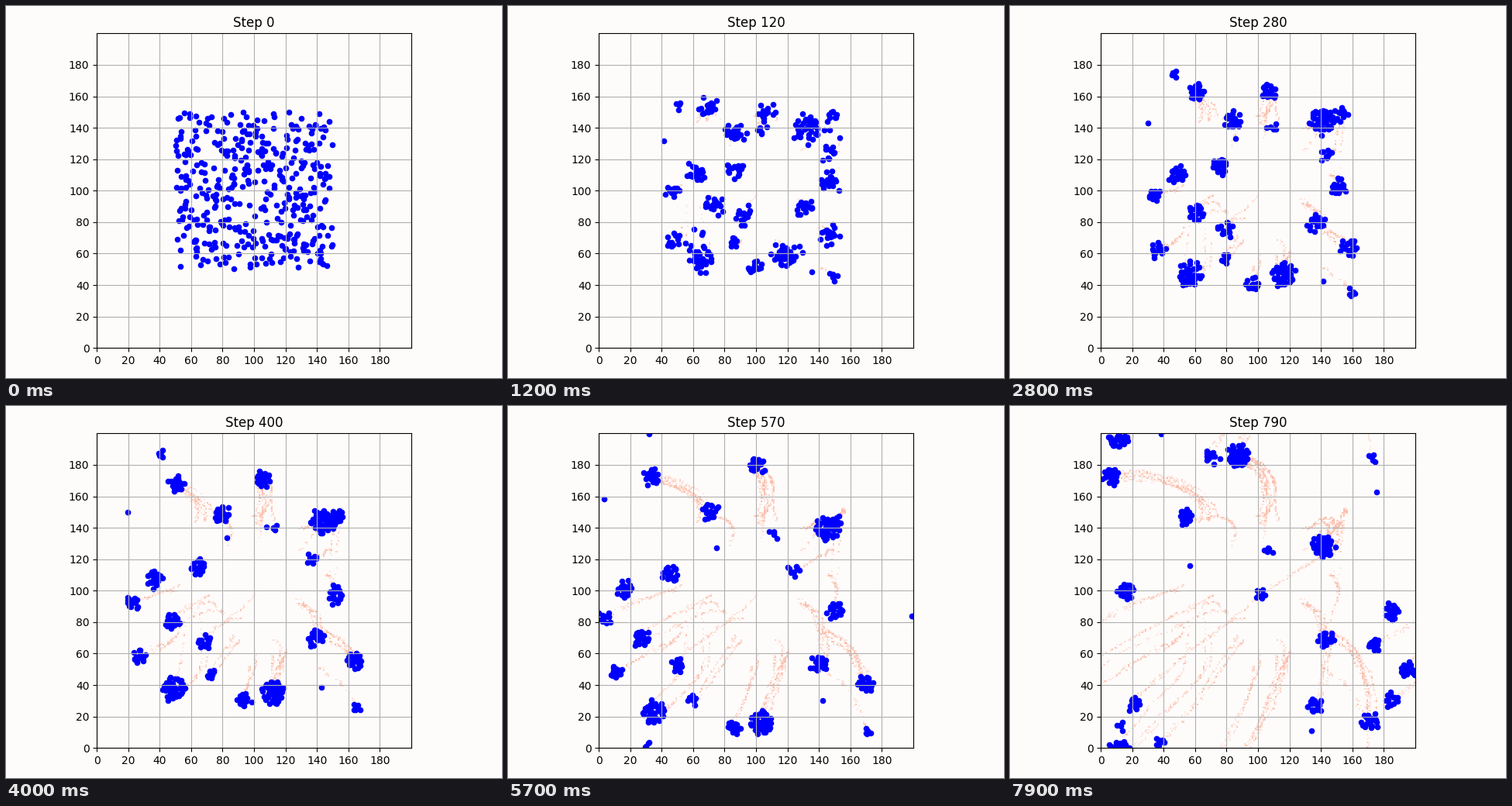
Write a matplotlib script that moves like this. It is 640 px wide and 480 px high and loops after 8 s.

```python
import numpy as np
import matplotlib.pyplot as plt
from matplotlib.animation import FuncAnimation

FRAMES, SUB = 80, 10
STEPS = FRAMES * SUB
SIZE = 200
BG = "#fefcfb"
GOLDEN = np.pi * (3 - np.sqrt(5))

# Flock size -> where such flocks gather and where they end (x0, y0, x1, y1).
FLOCKS = {
    40: [(134, 144, 141, 128), (64, 54, 11, -2), (118, 59, 87, -14)],
    20: [(62, 111, -15, 87), (147, 72, 171, 17), (130, 90, 136, 27),
         (71, 153, 6, 173), (74, 91, -5, 50), (88, 114, 16, 100),
         (147, 106, 143, 69), (106, 150, 88, 185), (86, 138, 54, 147)],
    14: [(46, 100, -26, 66), (45, 65, -15, 31), (91, 84, 21, 28),
         (99, 51, 70, -15), (149, 149, 141, 130)],
    8: [(150, 125, 102, 98), (86, 67, 38, 4)],
    5: [(51, 155, 13, 214), (149, 45, 173, -15), (104, 138, 106, 126)],
    1: [(41, 130, -24, 162), (136, 46, 134, 12), (87, 134, 59, 115)],
}

rng = np.random.default_rng(7)
counts = np.array([n for n, paths in FLOCKS.items() for _ in paths])
first, last = np.split(np.array(sum(FLOCKS.values(), []), float), 2, axis=1)
total = counts.sum()


def centres(t):
    """Flock centres: straight drifts, all bent by the same steady pull."""
    s = ((t - 12) / 67)[:, None, None]
    return first + s * (last - first) + 28 * s * (1 - s)


def assign(start, homes):
    """Give every agent the closest flock that still has room."""
    dist = np.linalg.norm(start[:, None] - homes, axis=2)
    flock, rank = np.full(total, -1), np.zeros(total, int)
    used = np.zeros(len(counts), int)
    for k in np.argsort(dist, axis=None):
        i, f = divmod(k, len(counts))
        if flock[i] < 0 and used[f] < counts[f]:
            flock[i], rank[i] = f, used[f]
            used[f] += 1
    return flock, rank


def wander():
    walk = np.zeros((STEPS, total, 2))
    for s in range(1, STEPS):
        walk[s] = 0.993 * walk[s - 1] + rng.normal(0, 0.1, (total, 2))
    return walk


def simulate():
    t = np.arange(STEPS) / SUB
    mid = centres(t)
    start = rng.uniform(50, 150, (total, 2))
    flock, rank = assign(start, mid[0])

    # packed disc around each centre
    radius = np.where(counts[flock] > 1, 1.1 * np.sqrt(rank + 0.4), 0)
    angle = rank * GOLDEN + flock
    slot = radius[:, None] * np.stack([np.cos(angle), np.sin(angle)], 1)

    fade = np.exp(-t / 8)[:, None, None]
    loose = (1 + 0.4 * np.exp(-t / 25))[:, None, None]
    pos = mid[:, flock] + fade * (start - mid[0, flock])
    return (pos + (1 - fade) * loose * slot + wander()) % SIZE


pos = simulate()

# A few agents leave a broken trace once the flocks have formed.
traces = pos[:, ::8] + rng.normal(0, 0.4, pos[:, ::8].shape)
kept = rng.random(traces.shape[:2]) < 0.12
kept[:5 * SUB] = False


def trail_image(frame):
    now = frame * SUB + 1
    x, y = traces[:now][kept[:now]].T
    hits, _, _ = np.histogram2d(y, x, bins=SIZE,
                                range=[[0, SIZE], [0, SIZE]])
    rgba = np.empty((SIZE, SIZE, 4))
    rgba[..., :3] = 0.98, 0.52, 0.38
    rgba[..., 3] = np.clip(0.17 * hits, 0, 0.5)
    return rgba


fig = plt.figure(figsize=(6.4, 4.8), dpi=100, facecolor=BG)
side = 405.8
ax = fig.add_axes([0.5 - side / 1280, 38.81 / 480, side / 640, side / 480],
                  facecolor=BG)
trail = ax.imshow(trail_image(0), origin="lower", extent=(0, SIZE, 0, SIZE),
                  interpolation="nearest", aspect="auto")
dots = ax.scatter(*pos[0].T, s=20, c="blue")
ticks = range(0, SIZE, 20)
ax.set(xlim=(0, SIZE), ylim=(0, SIZE), xticks=ticks, yticks=ticks)
ax.grid(True)
title = ax.set_title("Step 0")


def update(frame):
    dots.set_offsets(pos[frame * SUB])
    trail.set_data(trail_image(frame))
    title.set_text(f"Step {frame * SUB}")
    return dots, trail, title


anim = FuncAnimation(fig, update, frames=FRAMES, interval=100,
                     repeat=True, repeat_delay=0)
plt.show()
```
